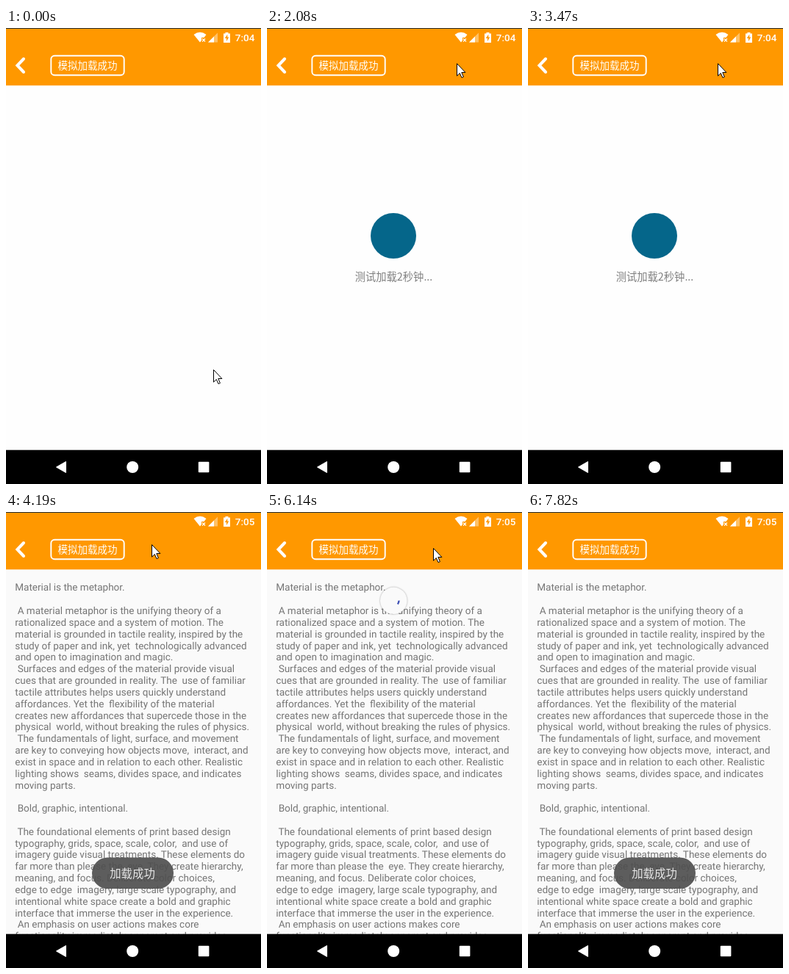
These frames come from a looping animation (347 by 621 pixels, 8660 ms). An HTML page:

```html
<!DOCTYPE html>
<html lang="zh">
<head>
<meta charset="utf-8">
<title>Loading states</title>
<style>
  html, body { margin: 0; width: 100%; height: 100%; overflow: hidden; background: #fff; }
  svg { display: block; width: 347px; height: 621px; }
  text { font-family: Roboto, "Noto Sans CJK SC", "Noto Sans CJK", sans-serif; white-space: pre; }
  .cjk { font-family: "Noto Sans CJK SC", "Noto Sans CJK", sans-serif; text-anchor: middle; }
  #copy { font-size: 13.5px; fill: #757575; text-rendering: geometricPrecision; }
  #disc { filter: drop-shadow(0 .6px 1.2px rgba(0, 0, 0, .35)); }
</style>
</head>
<body>
<svg viewBox="0 0 347 621">
  <rect id="page" width="347" height="621" fill="#fefefe"/>
  <g id="loading">
    <circle cx="172" cy="283" r="31" fill="#05668a"/>
    <text class="cjk" x="172.5" y="344.4" font-size="14.3" fill="#808080">测试加载2秒钟...</text>
  </g>
  <g id="copy"></g>

  <g id="spinner">
    <circle id="disc" r="18.3" fill="#fafafa"/>
    <path id="arc" fill="none" stroke="#3f51b5" stroke-width="2.4"/>
  </g>

  <g id="toast">
    <rect x="117" y="470.5" width="111" height="42.5" rx="21.2" fill="#505050" fill-opacity=".92"/>
    <text class="cjk" x="172" y="497.7" font-size="15.4" fill="#e6e6e6">加载成功</text>
  </g>

  <rect width="347" height="78.3" fill="#ff9800"/>
  <rect width="347" height="1" fill="#22303c"/>
  <path d="M24 42 15.4 51 24 60" fill="none" stroke="#fff" stroke-width="4" stroke-linecap="round"/>
  <rect x="61.3" y="37.7" width="99.4" height="26.6" rx="4.8" fill="none" stroke="#fff" stroke-width="1.9"/>
  <text class="cjk" x="111" y="55.5" font-size="13.5" fill="#fff">模拟加载成功</text>

  <g fill="#fff">
    <path d="M255.5 9Q264 2.5 272.5 9L269.5 13H266V17L264 19.5Z"/>
    <path d="M267 14.5 271 18.5M271 14.5 267 18.5" stroke="#fff" stroke-width="1.2"/>
    <path d="M275 19.5 288 6.5V19.5Z" opacity=".4"/>
    <path d="M275 19.5 283 11.5V19.5Z"/>
    <path d="M296 7.5H298.5V6H302.5V7.5H305V20H296Z"/>
    <path d="M301.3 8.8 297.8 14H300V18L303.3 12.6H301.3Z" fill="#ff9800"/>
    <text id="clock" x="311.8" y="17.5" font-size="13.5" font-weight="500"></text>
  </g>

  <rect y="574.7" width="347" height="47"/>
  <g fill="#fff">
    <path d="M68.5 598 81.5 590.5V605.5Z" stroke="#fff" stroke-linejoin="round"/>
    <circle cx="172.2" cy="598" r="8"/>
    <rect x="261.8" y="590.7" width="14.6" height="14.6" rx="1"/>
  </g>

  <path id="cursor" d="M.5.5V17.2L4.3 13.5 7 19.6 9.4 18.6 6.8 12.5H11.9Z" fill="#fff" stroke="#000"/>
</svg>

<script>
const LOOP = 8660;
const CONTENT_AT = 3530;
const REFRESH_AT = 4930;
const $ = id => document.getElementById(id);

const copy = `Material is the metaphor.

 A material metaphor is the unifying theory of a
rationalized space and a system of motion. The
material is grounded in tactile reality, inspired by the
study of paper and ink, yet  technologically advanced
and open to imagination and magic.
 Surfaces and edges of the material provide visual
cues that are grounded in reality. The  use of familiar
tactile attributes helps users quickly understand
affordances. Yet the  flexibility of the material
creates new affordances that supercede those in the
physical  world, without breaking the rules of physics.
 The fundamentals of light, surface, and movement
are key to conveying how objects move,  interact, and
exist in space and in relation to each other. Realistic
lighting shows  seams, divides space, and indicates
moving parts.

 Bold, graphic, intentional.

 The foundational elements of print based design
typography, grids, space, scale, color,  and use of
imagery guide visual treatments. These elements do
far more than please the  eye. They create hierarchy,
meaning, and focus. Deliberate color choices,
edge to edge  imagery, large scale typography, and
intentional white space create a bold and graphic
interface that immerse the user in the experience.
 An emphasis on user actions makes core
functionality immediately apparent and provides`;

copy.split("\n").forEach((line, i) => {
  const text = document.createElementNS("http://www.w3.org/2000/svg", "text");
  text.setAttribute("x", 12.3);
  text.setAttribute("y", 107.4 + i * 15.83);
  text.textContent = line;
  $("copy").append(text);
});

// Each step: time, then the values reached at that time.
const cursorSteps = [
  [0, 282, 465], [170, 282, 465], [350, 268, 584], [850, 116, 19], [1030, 104, 53],
  [1060, 104, 53], [1120, 104, 52], [1650, 104, 52], [2050, 258, 48],
  [3600, 258, 48], [4150, 198, 44], [4310, 196, 43], [4400, 183, 42],
  [4620, 183, 42], [4930, 108, 52], [5260, 108, 52], [5410, 249, 44],
  [5600, 249, 44], [6050, 226, 49], [7010, 226, 49], [7400, 250, 240], [7820, 318, 622]
];
const toastSteps = [
  [CONTENT_AT, 0], [3980, 1], [5340, 1], [5640, 0], [6890, 0], [7380, 1]
];
const spinnerSteps = [[5260, 0], [5410, 1], [6865, 1], [7020, 0]];

const clamp = v => Math.min(1, Math.max(0, v));
const ease = v => v * v * (3 - 2 * v);

function sample(steps, t) {
  const next = steps.findIndex(s => s[0] > t);
  if (next < 0) return steps[steps.length - 1].slice(1);
  if (next === 0) return steps[0].slice(1);
  const a = steps[next - 1], b = steps[next];
  const k = ease((t - a[0]) / (b[0] - a[0]));
  return a.slice(1).map((v, i) => v + (b[i + 1] - v) * k);
}

function drawSpinner(t) {
  const [scale] = sample(spinnerSteps, t);
  show("spinner", scale > 0);
  if (!scale) return;
  $("spinner").setAttribute("transform", `translate(172.3 120.8) scale(${scale})`);
  const cycle = (t - REFRESH_AT) / 1332;
  const phase = cycle % 1;
  const turn = 0.22 + cycle * 1.2 + Math.floor(cycle) * 0.75;
  const from = turn + 0.75 * ease(clamp(phase * 2 - 1));
  const to = turn + 0.05 + 0.75 * ease(clamp(phase * 2));
  const point = a => {
    const r = a * 2 * Math.PI;
    return `${7.2 * Math.cos(r)} ${7.2 * Math.sin(r)}`;
  };
  $("arc").setAttribute("d",
    `M${point(from)}A7.2 7.2 0 ${to - from > 0.5 ? 1 : 0} 1 ${point(to)}`);
  $("arc").setAttribute("opacity", clamp((t - 5410) / 150));
}

function show(id, on) {
  $(id).style.display = on ? "" : "none";
}

function draw(t) {
  const loaded = t >= CONTENT_AT;
  show("loading", t >= 1650 && !loaded);
  show("copy", loaded);
  $("page").setAttribute("fill", loaded ? "#fafafa" : "#fefefe");
  $("clock").textContent = loaded ? "7:05" : "7:04";
  $("toast").setAttribute("opacity", sample(toastSteps, t)[0]);
  $("cursor").setAttribute("transform", `translate(${sample(cursorSteps, t).map(Math.round)})`);
  drawSpinner(t);
}

const start = performance.now();
function tick() {
  draw((performance.now() - start) % LOOP);
  requestAnimationFrame(tick);
}
tick();
</script>
</body>
</html>
```
